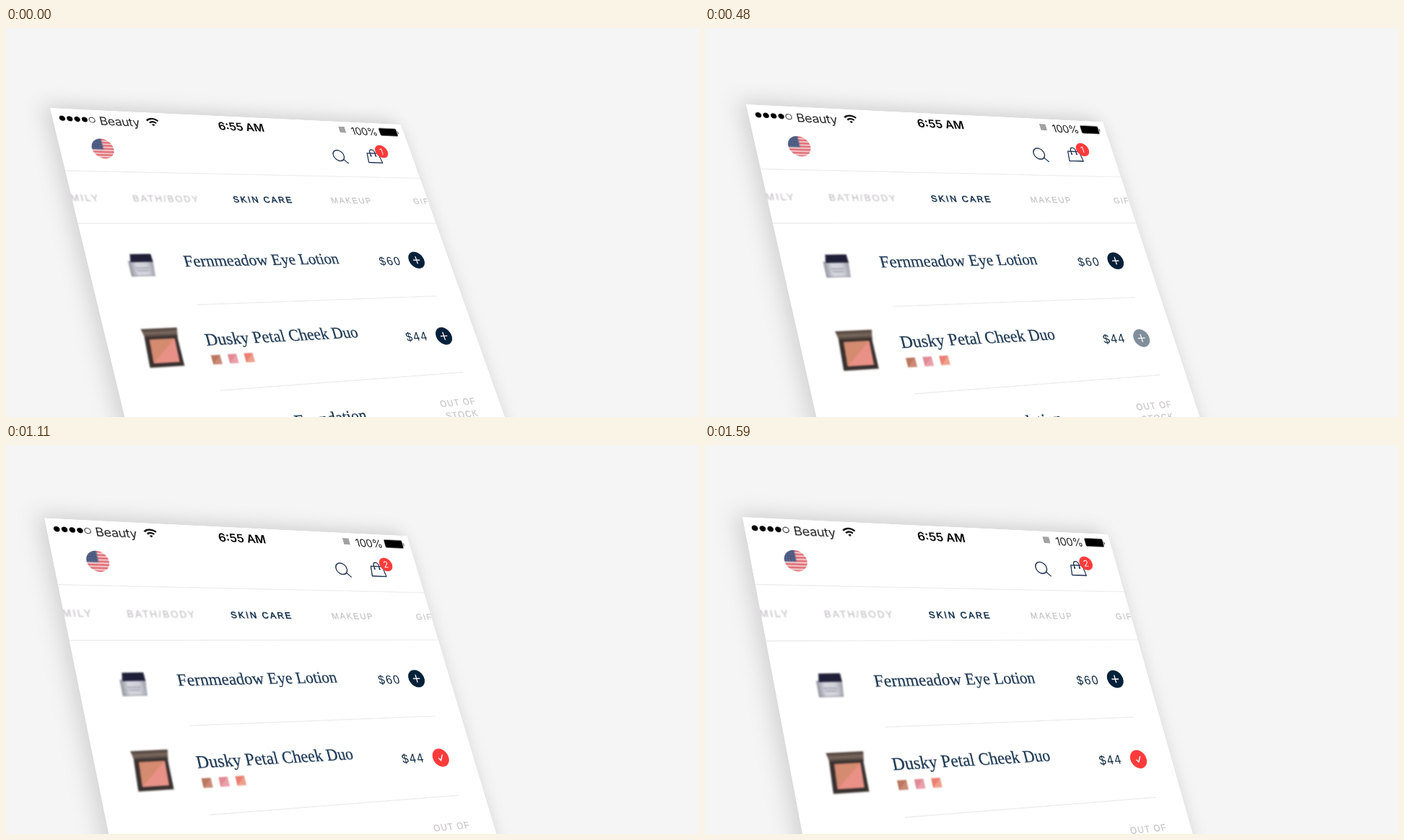
Recreate the animation shown at these times as an HTML page. Size 960 by 540 pixels, loop 1.62 s.

```html
<!DOCTYPE html>
<html lang="en">
<head>
<meta charset="utf-8">
<title>Beauty shop</title>
<style>
  html, body { margin: 0; width: 100%; height: 100%; overflow: hidden; background: #f5f5f5; }
  #stage { position: fixed; inset: 0; overflow: hidden; contain: strict; }
  #screen {
    position: absolute; left: 0; top: 0; width: 750px; height: 720px;
    background: #fff; transform-origin: 0 0;
    box-shadow: -8px -5px 40px rgba(0, 0, 0, .17);
  }
  svg { display: block; width: 100%; height: 100%; overflow: hidden; }
  .status { font: 12px Inter, Roboto, sans-serif; fill: #222; letter-spacing: -.2px; }
  .nav { font: 9px "Liberation Sans", Arial, sans-serif; letter-spacing: 1.5px; fill: #c3bfc3; stroke: #c3bfc3; stroke-width: .15; }
  .nav .on { fill: #14304c; stroke: #14304c; stroke-width: .4; letter-spacing: 1.65px; }
  .title { font: 16px "Liberation Serif", "Times New Roman", serif; fill: #1d3853; stroke: #1d3853; stroke-width: .2; }
  .price { font: 12.5px "Liberation Sans", Arial, sans-serif; letter-spacing: 1.4px; fill: #0c2740; }
  .rule { stroke: #e9e9e9; stroke-width: .8; }
  .icon { fill: none; stroke: #1d3050; stroke-width: 1.1; stroke-linejoin: round; }
  .mark { fill: none; stroke: #fff; stroke-width: 1.1; }
  .soft { filter: blur(.7px); }
  .hazy { filter: blur(.4px); }
</style>
</head>
<body>
<div id="stage">
<div id="screen">
<svg viewBox="0 0 375 360">
  <defs>
    <pattern id="stripes" width="30" height="3.2" y="30.2" patternUnits="userSpaceOnUse">
      <rect width="30" height="3.2" fill="#f6eff1"/><rect width="30" height="1.7" fill="#dc4a52"/>
    </pattern>
    <pattern id="stars" width="2.4" height="2.4" patternUnits="userSpaceOnUse">
      <rect width="2.4" height="2.4" fill="#3c4c76"/><circle cx="1.2" cy="1.2" r=".5" fill="#cfd5e4"/>
    </pattern>
    <clipPath id="round"><circle cx="40" cy="40.4" r="10.3"/></clipPath>
    <linearGradient id="jar"><stop stop-color="#92929e"/><stop offset=".3" stop-color="#d6d6de"/><stop offset=".7" stop-color="#d0d0d8"/><stop offset="1" stop-color="#9a9aa6"/></linearGradient>
    <linearGradient id="lid" x2="0" y2="1"><stop stop-color="#4a3d37"/><stop offset=".5" stop-color="#7b6a5f"/><stop offset="1" stop-color="#2d2624"/></linearGradient>
  </defs>

  <g class="status">
    <g fill="#000" id="dots"></g>
    <text x="43.5" y="15.6">Beauty</text>
    <g fill="none" stroke="#111" stroke-width="1.7">
      <path d="M89.8 8.9a8 8 0 0 1 11.2 0M92.1 11.2a4.8 4.8 0 0 1 6.6 0"/>
      <path d="M95.4 14.6l-1.5-1.6a2.2 2.2 0 0 1 3 0z" fill="#111" stroke="none"/>
    </g>
    <text x="186.5" y="15.6" text-anchor="middle" font-weight="600" fill="#000" style="letter-spacing:0">6:55 AM</text>
    <rect x="297" y="6" width="7" height="7" fill="#a2a2a2"/>
    <text x="310.8" y="14.8">100%</text>
    <rect x="345" y="5.6" width="21.4" height="9" rx="1.6" fill="#000" stroke="#8a8a8a" stroke-width=".6"/>
    <path d="M367.3 8.3q1.6 1.9 0 3.8z" fill="#000"/>
  </g>

  <g clip-path="url(#round)">
    <g class="hazy">
      <rect x="29" y="29" width="22" height="23" fill="url(#stripes)"/>
      <rect x="28" y="28" width="12.5" height="13.4" fill="url(#stars)"/>
    </g>
  </g>
  <g class="icon">
    <circle cx="286.1" cy="40" r="6.1"/><path d="M290.5 44.4l4.4 4.6"/>
    <path d="M320.8 36.2h13.2l1.6 10.9h-16.4zM324.4 39v-4.2a2.9 2.9 0 0 1 5.8 0V39"/>
    <g fill="#1d3050" stroke="none"><circle cx="324.4" cy="39" r="1"/><circle cx="330.2" cy="39" r="1"/></g>
  </g>
  <circle id="ring" cx="338" cy="34" fill="none" stroke="#ff3b3b"/>
  <g id="badge">
    <circle r="7.5" fill="#ff3b3b"/>
    <text id="count" y="3.4" text-anchor="middle" fill="#fff" font-family="Inter, Roboto, sans-serif" font-size="9.5"></text>
  </g>

  <path class="rule" d="M0 64H375M0 116H375M90 196H345M90 276H345"/>
  <g class="nav">
    <g class="hazy">
      <text x="25.2" y="94" text-anchor="end">FAMILY</text>
      <text x="56" y="94">BATH/BODY</text>
    </g>
    <text class="on" x="155" y="94">SKIN CARE</text>
    <text x="260.5" y="94">MAKEUP</text>
    <text x="356.8" y="94">GIFTS</text>
    <g text-anchor="middle" style="letter-spacing:1.2px">
      <text x="327.6" y="308.3">OUT OF</text>
      <text x="327.6" y="320.3">STOCK</text>
    </g>
  </g>

  <g class="soft">
    <path d="M36.6 152.5H59.7L58.3 167.5H36.4z" fill="url(#jar)"/>
    <path d="M40 146H59.2L59.5 153.8H38.6z" fill="#201f38"/>
    <path d="M42 159.5h12M43 162h10M37 166.8h21" stroke="#8f8f9e" stroke-width=".7"/>
  </g>
  <g class="soft">
    <path d="M34 224H63.8L63.4 251.6H32.2z" fill="#38302f"/>
    <path d="M32.6 216.5H65.6L64 225.5H34.5z" fill="url(#lid)"/>
    <path d="M38 226.4H61L60 248H36.5z" fill="#ea9187"/>
    <path d="M38 226.4H61L36.5 248z" fill="#d58b6f"/>
  </g>
  <g id="swatches" class="hazy"></g>

  <g class="title">
    <text x="88.6" y="159">Fernmeadow Eye Lotion</text>
    <text x="88.8" y="234.5">Dusky Petal Cheek Duo</text>
    <text x="88.8" y="314.5">Airy Tint Foundation</text>
  </g>
  <g class="price">
    <text x="292.5" y="161.6">$60</text>
    <text x="294" y="241.2">$44</text>
  </g>
  <g transform="translate(336 156.8)">
    <circle r="9.1" fill="#04213a"/><path class="mark" d="M-4 0H4M0-4V4"/>
  </g>
  <g transform="translate(337.4 238)">
    <g id="plus"><circle r="9.1" fill="#04213a"/><path class="mark" d="M-4 0H4M0-4V4"/></g>
    <g id="check"><circle r="9.1" fill="#ff3b3b"/><path class="mark" d="M-2.6 .2L-.7 2.8L2.8-3"/></g>
  </g>
</svg>
</div>
</div>
<script>
const $ = id => document.getElementById(id);
const LOOP = 1620, STEP = 30;

for (let i = 0; i < 5; i++)
  $('dots').innerHTML += `<circle cx="${9 + 6.9 * i}" cy="${10.2 + .12 * i}" r="2.7"` +
    (i == 4 ? ' fill="#fff" stroke="#333" stroke-width=".7"/>' : '/>');

[['#b9785f', '#cb8a76'], ['#e18a95', '#eaa0aa'], ['#ea7f74', '#efa08b']].forEach(([low, high], i) => {
  const x = 90.2 + 15.7 * i;
  $('swatches').innerHTML += `<path d="M${x} 243.8h8.5v8.5h-8.5z" fill="${high}"/>` +
    `<path d="M${x} 252.3v-8.5h8.5z" fill="${low}"/>`;
});

// Screen corners: x and y at the start, x and y at the end, ease-out power
const corners = [
  [61, 111, 52, 100, 1.7],
  [547, 134, 558, 124, 1.25],
  [668, 475.3, 660.5, 486.2, 1.15],
  [158, 513.6, 132.8, 528.6, 1.15]
];

const ramp = (t, from, to) => Math.min(1, Math.max(0, (t - from) / (to - from)));

// Maps a w by h rectangle onto four points, clockwise from the top left
function project(w, h, [[x0, y0], [x1, y1], [x2, y2], [x3, y3]]) {
  const ax = x1 - x2, bx = x3 - x2, sx = x0 - x1 + x2 - x3;
  const ay = y1 - y2, by = y3 - y2, sy = y0 - y1 + y2 - y3;
  const det = ax * by - bx * ay;
  const p = (sx * by - bx * sy) / det, q = (ax * sy - sx * ay) / det;
  return `matrix3d(${[
    (x1 - x0 + p * x1) / w, (y1 - y0 + p * y1) / w, 0, p / w,
    (x3 - x0 + q * x3) / h, (y3 - y0 + q * y3) / h, 0, q / h,
    0, 0, 1, 0, x0, y0, 0, 1]})`;
}

function draw(now) {
  const t = Math.floor(now % LOOP / STEP) * STEP;
  const left = 1 - t / (LOOP - STEP);
  $('screen').style.transform = project(750, 552, corners.map(([x, y, endX, endY, power]) => {
    const e = 1 - left ** power;
    return [x + (endX - x) * e, y + (endY - y) * e];
  }));

  $('plus').setAttribute('opacity', 1 - ramp(t, 420, 540));
  $('check').setAttribute('opacity', ramp(t, 540, 720));

  const pop = 1 + .3 * Math.sin(Math.PI * ramp(t, 540, 810));
  $('badge').setAttribute('transform', `translate(339 33.7) scale(${pop})`);
  $('count').textContent = t < 600 ? 1 : 2;

  const wave = ramp(t, 750, 1050);
  $('ring').setAttribute('r', 7.5 + 10.5 * wave);
  $('ring').setAttribute('opacity', wave > 0 ? 1 - wave : 0);
}

const start = performance.now();
function tick() {
  draw(performance.now() - start);
  requestAnimationFrame(tick);
}
tick();
</script>
</body>
</html>
```
